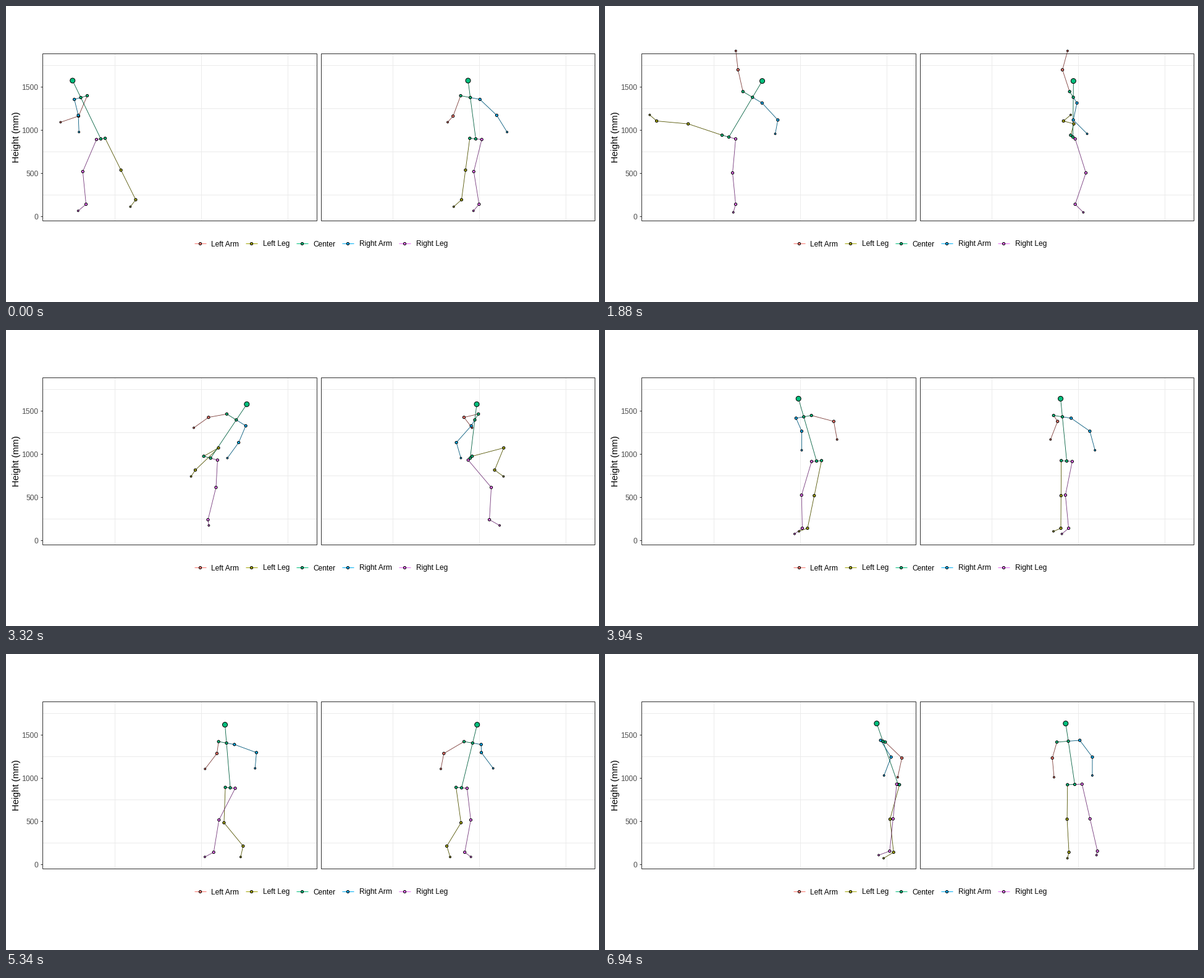
Write a matplotlib script that moves like this. It is 960 by 480 pixels and loops after 6.96 s.

```python
import numpy as np
import matplotlib.pyplot as plt
from matplotlib.animation import FuncAnimation
from matplotlib.collections import LineCollection
from matplotlib.colors import to_rgb
from matplotlib.patches import Rectangle

W, H, DPI = 960, 480, 72
STEP, LOOP = 20, 6960

L_ARM, L_LEG, MID, R_ARM, R_LEG = COLORS = [
    "#F8766D", "#A3A500", "#00BF7D", "#00B0F6", "#E76BF3"]
NAMES = ["Left Arm", "Left Leg", "Center", "Right Arm", "Right Leg"]

# Body proportions in pixels
SPINE, SHOULDER, HIP = 75, 19, 12
UPPER_ARM, FOREARM, THIGH, SHANK, FOOT = 38, 32, 58, 54, 19
GROUND = 321

SIDE, FRONT, UP = np.eye(3)
STAND = (-4, 9)

times, states = [], []


def pose(t, yaw, root, lean, hands, feet=(STAND, STAND)):
    """Key pose. Vectors are (left, forward, up) seen from the turning body:
    hands from the shoulders, feet from the hips with a lift off the ground."""
    feet = [(*f, 0)[:3] for f in feet]
    times.append(t)
    states.append(np.hstack([np.radians(yaw), root, lean, *hands, *feet]))


# Step out and wind up
pose(0, -52, (153, 760, 215), (-13, 31),
     [(-10, 47, -43), (-30, -33, -53)], [(44, -33), (-7, 16)])
pose(1080, 7, (168, 757, 219), (0, 41),
     [(64, 21, 17), (-19, -65, 18)], [(29, 36, 5), (-42, 3, 16)])
# Spinning side kick
pose(1880, 196, (200, 757, 212), (-37, -10),
     [(12, 0, 66), (-25, 10, -50)], [(105, 18, 135), (0, 0)])
pose(2680, 385, (293, 753, 204), (-64, 9),
     [(61, -15, 10), (47, -6, -45)], [(72, 39, 183), (45, 35, 23)])
# Land, turn round and walk off
pose(3940, 673, (342, 747, 212), (-9, 20),
     [(32, -27, -39), (-22, -33, -52)], [(-15, 17), (-6, 15)])
pose(4620, 855, (332, 737, 211), (-8, 26),
     [(44, -38, -36), (-59, -28, -24)], [(0, 0), (6, 5)])
pose(6020, 983, (410, 744, 220), (-8, 9),
     [(32, 16, -54), (-6, -1, -61)], [(-17, -44, 16), (28, 38)])
pose(6940, 1000, (474, 760, 211), (6, 26),
     [(8, -19, -57), (-19, -9, -57)], [STAND, (-27, 7)])

times = np.array(times, float)
states = np.array(states)
slopes = np.gradient(states, times, axis=0)


def hermite(t):
    k = min(np.searchsorted(times, t, side="right") - 1, len(times) - 2)
    h = times[k + 1] - times[k]
    u = (t - times[k]) / h
    return ((2*u**3 - 3*u**2 + 1) * states[k] + (3*u**2 - 2*u**3) * states[k + 1]
            + h * ((u**3 - 2*u**2 + u) * slopes[k] + (u**3 - u**2) * slopes[k + 1]))


def unit(v):
    return v / max(np.linalg.norm(v), 1e-6)


def across(v, axis):
    """Direction of v at right angles to axis."""
    return unit(v - v.dot(axis) * axis)


def bend(start, reach, first, second, pole):
    """Middle joint and end of a two-bone limb that bends toward pole."""
    axis, dist = unit(reach), np.linalg.norm(reach)
    dist = np.clip(dist, abs(first - second) + 1, first + second)
    along = (dist**2 + first**2 - second**2) / (2 * dist)
    off = np.sqrt(max(first**2 - along**2, 0))
    return start + along * axis + off * across(pole, axis), start + dist * axis


def skeleton(t):
    """Joint positions in the left and the right panel."""
    s = hermite(t)
    yaw, root, lean = s[0], s[1:4], s[4:6]
    hands, feet = s[6:12].reshape(2, 3), s[12:].reshape(2, 3)

    neck = np.append(lean, np.sqrt(SPINE**2 - lean.dot(lean)))
    chest = across(SIDE, unit(neck))
    hips = unit(SIDE + chest)
    p = {"pelvis": 0 * UP, "neck": neck, "head": 1.41 * neck}

    for n, side, hand, foot in zip("LR", (1, -1), hands, feet):
        p[n + "shoulder"] = shoulder = neck + side * SHOULDER * chest
        p[n + "elbow"], p[n + "hand"] = bend(
            shoulder, hand, UPPER_ARM, FOREARM, 0.5 * side * SIDE - FRONT)

        p[n + "hip"] = hip = side * HIP * hips
        reach = foot - UP * (hip[2] + GROUND - root[2])
        # A raised leg also bends upward
        pole = FRONT + UP * max(0, 3 * unit(reach)[2])
        p[n + "knee"], p[n + "ankle"] = knee, ankle = bend(
            hip, reach, THIGH, SHANK, pole)
        shin = unit(ankle - knee)
        p[n + "toe"] = ankle + FOOT * unit(across(pole, shin) + 0.45 * shin)

    left, front, up = np.array([p[j] for j in JOINTS]).T
    a = root[0] + left * np.cos(yaw) + front * np.sin(yaw)
    b = root[1] + left * np.sin(yaw) - front * np.cos(yaw)
    return [np.column_stack([x, root[2] - up]) for x in (a, b)]


def chain(color, *names):
    return [(p, q, color) for p, q in zip(names, names[1:])]


JOINTS = {"pelvis": MID, "neck": MID, "head": MID}
for n, arm, leg in (("L", L_ARM, L_LEG), ("R", R_ARM, R_LEG)):
    JOINTS |= {n + j: arm for j in ("shoulder", "elbow", "hand")}
    JOINTS |= {n + j: leg for j in ("hip", "knee", "ankle", "toe")}
JOINTS["Lshoulder"] = JOINTS["Lhip"] = MID

BONES = (
    chain(L_ARM, "Lshoulder", "Lelbow", "Lhand")
    + chain(L_LEG, "Lhip", "Lknee", "Lankle", "Ltoe")
    + chain(MID, "head", "neck", "pelvis", "Lhip") + chain(MID, "neck", "Lshoulder")
    + chain(R_ARM, "neck", "Rshoulder", "Relbow", "Rhand")
    + chain(R_LEG, "pelvis", "Rhip", "Rknee", "Rankle", "Rtoe"))
ORDER = list(JOINTS)
ENDS = [[ORDER.index(p), ORDER.index(q)] for p, q, _ in BONES]


def diameter(joint):
    if joint == "head":
        return 8
    return 2.8 if joint.endswith(("hand", "toe")) else 4.2


plt.rcParams["font.family"] = "Liberation Sans"
fig = plt.figure(figsize=(W / DPI, H / DPI), dpi=DPI, facecolor="white")
ax = fig.add_axes([0, 0, 1, 1])
ax.set_xlim(-0.5, W - 0.5)
ax.set_ylim(H - 0.5, -0.5)
ax.axis("off")


def line(x, y, color):
    ax.plot(x, y, color=color, lw=1, solid_capstyle="butt", zorder=1)


for left, right, first in [(58, 502, 175), (509, 952, 625)]:
    for x in first + 140.3 * np.arange(3):
        line([x, x], [76, 347], "#EBEBEB")
    for y in 95 + 70 * np.arange(4):
        line([left, right], [y, y], "#EBEBEB")
    ax.add_patch(Rectangle((left, 76), right - left, 271, fill=False,
                           ec="#333333", lw=1, zorder=5))

for i, label in enumerate(["1500", "1000", "500", "0"]):
    y = 130 + 70 * i
    line([55, 58], [y, y], "#333333")
    ax.text(52, y + 5, label, size=12, color="#4D4D4D", ha="right", va="baseline")
ax.text(20, 212, "Height (mm)", size=15, rotation=90, rotation_mode="anchor",
        ha="center", va="baseline")

for x, name, color in zip((304, 387, 469, 543, 635), NAMES, COLORS):
    line([x, x + 19], [384, 384], color)
    ax.scatter([x + 9.5], [384], s=4.2**2, c=[color], edgecolors="black",
               linewidths=1, zorder=3)
    ax.text(x + 28, 389, name, size=12, va="baseline")

shades = [tuple(0.5 * v for v in to_rgb(c)) for *_, c in BONES]
bones = LineCollection([], colors=shades * 2, linewidths=0.85, zorder=3)
ax.add_collection(bones)
dots = ax.scatter(*np.zeros((2, 2 * len(ORDER))), c=list(JOINTS.values()) * 2,
                  s=[diameter(j)**2 for j in ORDER] * 2,
                  edgecolors="black", linewidths=1, zorder=4)


def update(i):
    views = skeleton(i * STEP)
    bones.set_segments([v[e] for v in views for e in ENDS])
    dots.set_offsets(np.vstack(views))
    return bones, dots


anim = FuncAnimation(fig, update, frames=LOOP // STEP, interval=STEP,
                     repeat=True, repeat_delay=0, blit=False)
plt.show()
```
